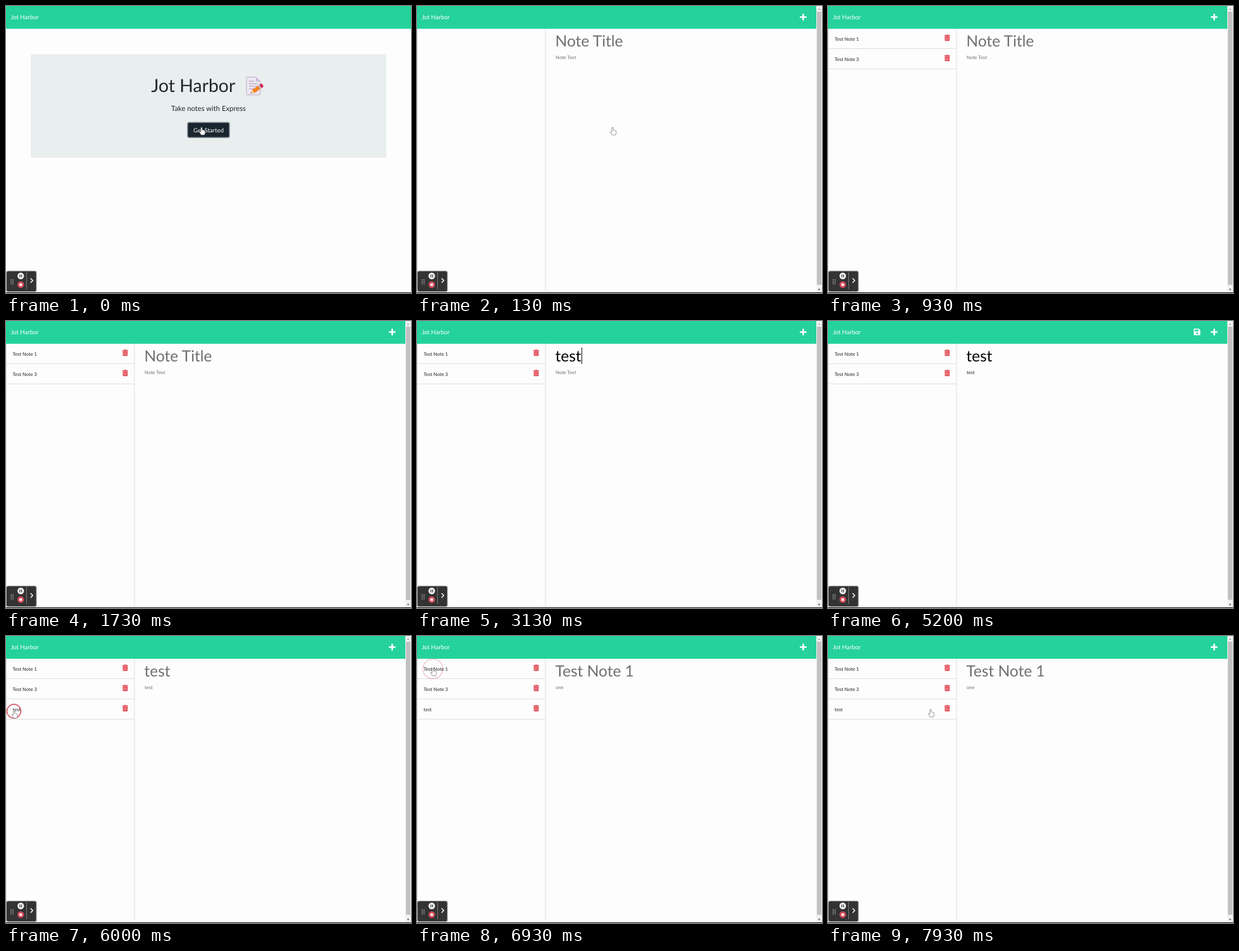
An HTML page that plays this animation: 640 px wide and 454 px high, repeating every 8 s.

```html
<!DOCTYPE html>
<html lang="en">
<head>
<meta charset="utf-8">
<title>Jot Harbor</title>
<style>
  html, body { margin: 0; width: 100%; height: 100%; overflow: hidden; background: #fdfdfd; }
  svg { display: block; width: 640px; height: 454px; }
  text { font-family: Lato, "Open Sans", sans-serif; text-rendering: geometricPrecision; white-space: pre; }
  .small { font-size: 7.6px; fill: #222; }
  .big { font-size: 24.5px; }
  .line { stroke: #dedede; fill: none; }
</style>
</head>
<body>
<svg viewBox="0 0 640 454">
  <defs>
    <g id="trash">
      <path d="M3 0h2.8l.6.8h2.4v1.3H0V.8h2.4zM.6 2.7h7.6V9a1 1 0 0 1-1 1H1.6a1 1 0 0 1-1-1z" fill="#df4450"/>
      <path d="M2.5 4v4.7M4.4 4v4.7M6.3 4v4.7" stroke="#f6c3c7" stroke-width=".7"/>
    </g>
    <path id="hand" d="M-1.1 7.4V.9a1.1 1.1 0 0 1 2.2 0V4.3q.9-.5 1.6.3 1-.4 1.5.5 1.4-.2 1.4 1.2V8.600q0 1.600-1.100 3.400H-.6Q-2 9.700-3.300 7.500-3.400 6.300-2.200 6.500z"
      fill="#fff" stroke="#666" stroke-width=".7" stroke-linejoin="round"/>
    <path id="arrow" d="M0 0V7.300L1.700 5.800 2.800 8.300 4 7.700 2.900 5.300H5.100z"
      fill="#222" stroke="#fff" stroke-width=".6"/>
  </defs>

  <rect width="640" height="454" fill="#fdfdfd"/>
  <rect width="640" height="36" fill="#25d29b"/>
  <text x="7.400" y="21" font-size="9.500" fill="#fff">Jot Harbor</text>

  <g id="home">
    <rect x="39" y="76.500" width="562" height="163.500" rx="2" fill="#e9eeee"/>
    <text x="229.500" y="136.300" font-size="28.400" fill="#212529">Jot Harbor</text>
    <g>
      <path d="M381.500 112.500H395l7 7V139a1.500 1.500 0 0 1-1.500 1.500h-19A1.500 1.500 0 0 1 380 139v-25a1.500 1.500 0 0 1 1.500-1.500z" fill="#ece6f2" stroke="#b7a5c4" stroke-width=".9"/>
      <path d="M395 112.500v7h7z" fill="#cbb9d6"/>
      <path d="M384 119h8M384 123h14M384 127h13M384 131h8" stroke="#a99bb5" stroke-width="1.100"/>
      <g transform="translate(386.500 138.200) rotate(-35)">
        <path d="M0 0 5-3.200V3.200z" fill="#f8d3a2"/>
        <path d="M0 0 1.700-1.100V1.100z" fill="#41383d"/>
        <path d="M5-3.200H17V3.200H5z" fill="#f58428"/>
        <path d="M17-3.200h2V3.200H17z" fill="#b9cad6"/>
        <path d="M19-3.200h2.500a2 2 0 0 1 2 2V1.200a2 2 0 0 1-2 2H19z" fill="#d22358"/>
      </g>
    </g>
    <text x="320" y="165.600" font-size="11.250" fill="#212529" text-anchor="middle">Take notes with Express</text>
    <rect x="286.800" y="184" width="66.400" height="24.200" rx="2.500" fill="#1a252f" stroke="#9aa5ac" stroke-width="1.400"/>
    <text x="320" y="199.600" font-size="9.500" fill="#fff" text-anchor="middle">Get Started</text>
  </g>

  <g id="app">
    <path class="line" d="M.5 36V450M203 36V450"/>
    <path d="M610.300 13.200V21.800M606 17.500h8.600" stroke="#fff" stroke-width="2.500" stroke-linecap="round"/>
    <g id="save">
      <path d="M579 12h6.800L588.400 14.600V21.400a1 1 0 0 1-1 1H579a1 1 0 0 1-1-1V13a1 1 0 0 1 1-1z" fill="#fff"/>
      <path d="M579.500 13.500h5.700v2.800h-5.700z" fill="#25d29b"/>
      <circle cx="583.200" cy="19.200" r="1.500" fill="#25d29b"/>
    </g>
    <g id="rows"></g>
    <text id="title" class="big" x="218.600" y="64.200"></text>
    <text id="body" class="small" x="219" y="83.800"></text>
    <rect id="caret" width="1" fill="#111"/>
    <rect x="631" width="9" height="453" fill="#f1f1f1"/>
    <rect x="632" y="9" width="7" height="432" fill="#c1c1c1"/>
    <path d="M633.600 6 635.500 3.600 637.400 6z" fill="#a5a5a5"/>
    <path d="M633.600 447.500 635.500 450 637.400 447.500z" fill="#505050"/>
  </g>

  <path d="M0 453.500H640" stroke="#111"/>
  <rect x="0" y="418.500" width="49" height="34.500" rx="3" fill="#000" opacity=".18"/>
  <rect x="1" y="419.500" width="46.700" height="32" rx="2.500" fill="#333"/>
  <path d="M8.200 432.500v8M11.200 432.500v8" stroke="#ccc" stroke-width="1.400" stroke-dasharray="1.200 1.200"/>
  <circle cx="23.300" cy="427" r="5.200" fill="#f4f4f4"/>
  <path d="M22 424.800v4.400M24.600 424.800v4.400" stroke="#333" stroke-width="1.200"/>
  <circle cx="23.300" cy="440.800" r="5.200" fill="#d3485a"/>
  <rect x="21.300" y="438.800" width="4" height="4" fill="#fff"/>
  <path d="M32.500 421V448" stroke="#777"/>
  <path d="M38.800 430.800 42.300 434.300 38.800 437.800" fill="none" stroke="#fff" stroke-width="1.400"/>

  <circle id="ring" fill="none" stroke="#d94b5b" stroke-width="1.400"/>
  <use id="pointer"/>
</svg>
<script>
const $ = id => document.getElementById(id);
const show = (el, on) => el.setAttribute('visibility', on ? 'inherit' : 'hidden');
const place = (el, attrs) => { for (const k in attrs) el.setAttribute(k, attrs[k]); };

const LOOP = 8000, STEP = 200 / 3;
const OPEN = 60, LISTED = 200, FOCUS = 2260, TAB = 3330, SAVE = 4730, SAVED = 5260, PICK = 5800, PICK2 = 6600;
const WORD = 'test';
const titleKeys = [2600, 2730, 2800, 2930];
const bodyKeys = [3600, 3670, 3800, 3900];
const rowTimes = [LISTED, LISTED, SAVED];

// time, x, y of the pointer tip
const path = [
  [0, 309, 192], [260, 309, 192], [1400, 300, 57], [3900, 300, 57], [4460, 571.8, 20],
  [4660, 583, 17], [4860, 583, 17], [5260, 330, 78], [5660, 20, 116], [5800, 12.500, 118],
  [6130, 12.500, 118], [6500, 25, 51], [7000, 25, 51], [7930, 162, 116]
];
const clicks = [[FOCUS, 300, 57], [SAVE, 583, 18], [PICK, 12.500, 119], [PICK2, 25, 52]];

$('rows').innerHTML = ['Test Note 1', 'Test Note 3', WORD].map((name, i) => `
  <g transform="translate(0 ${32 * i})">
    <text class="small" x="10.500" y="54.500">${name}</text>
    <use href="#trash" x="184" y="45.300"/>
    <path class="line" d="M0 67.500H203"/>
  </g>`).join('');
const rows = [...$('rows').children];

function pointerAt(t) {
  const i = path.findIndex(p => p[0] > t);
  if (i < 0) return path[path.length - 1].slice(1);
  const [a, b] = [path[i - 1], path[i]];
  const u = (t - a[0]) / (b[0] - a[0]), e = u * u * (3 - 2 * u);
  return [a[1] + (b[1] - a[1]) * e, a[2] + (b[2] - a[2]) * e];
}

function shape(t, x, y) {
  if (t < 260) return 'hand';
  if (y < 36) return x > 577 ? 'hand' : 'arrow';
  return x < 203 ? 'hand' : '';
}

function setField(el, value, hint, locked, ink) {
  el.textContent = value || hint;
  el.style.fill = value && !locked ? ink : '#707070';
}

function drawCaret(t) {
  const inTitle = t < TAB;
  const keys = inTitle ? titleKeys : bodyKeys;
  const last = Math.max(inTitle ? FOCUS : TAB, ...keys.filter(k => k <= t));
  const el = inTitle ? $('title') : $('body');
  const typed = keys[0] <= t;
  const x = (inTitle ? 218.600 : 219) + (typed ? el.getComputedTextLength() : 0);
  place($('caret'), { x: Math.round(x), y: inTitle ? 42 : 76.500, height: inTitle ? 26 : 10 });
  show($('caret'), t >= FOCUS && t < SAVE && (t - last) % 1000 < 500);
}

function draw(t) {
  const typed = keys => WORD.slice(0, keys.filter(k => k <= t).length);
  let title = typed(titleKeys), body = typed(bodyKeys);
  if (t >= SAVED) title = body = t < PICK ? '' : WORD;
  if (t >= PICK2) [title, body] = ['Test Note 1', 'one'];

  show($('home'), t < OPEN);
  show($('app'), t >= OPEN);
  rows.forEach((row, i) => show(row, t >= Math.max(OPEN, rowTimes[i])));
  setField($('title'), title, 'Note Title', t >= PICK, '#000');
  setField($('body'), body, 'Note Text', t >= PICK, '#222');
  show($('save'), t >= bodyKeys[0] && t < SAVED);
  drawCaret(t);

  const [x, y] = pointerAt(t), kind = shape(t, x, y);
  show($('pointer'), kind);
  if (kind) place($('pointer'), { href: '#' + kind, x, y });

  const click = clicks.find(c => t >= c[0] && t < c[0] + 400);
  show($('ring'), click);
  if (click) {
    const u = (t - click[0]) / 400;
    place($('ring'), { cx: click[1], cy: click[2], r: 4 + 14 * u, opacity: Math.min(1, 2 - 2 * u) });
  }
}

const start = performance.now();
function tick() {
  const t = (performance.now() - start) % LOOP;
  draw(Math.floor((t + 6.700) / STEP) * STEP);
  requestAnimationFrame(tick);
}
tick();
</script>
</body>
</html>
```
